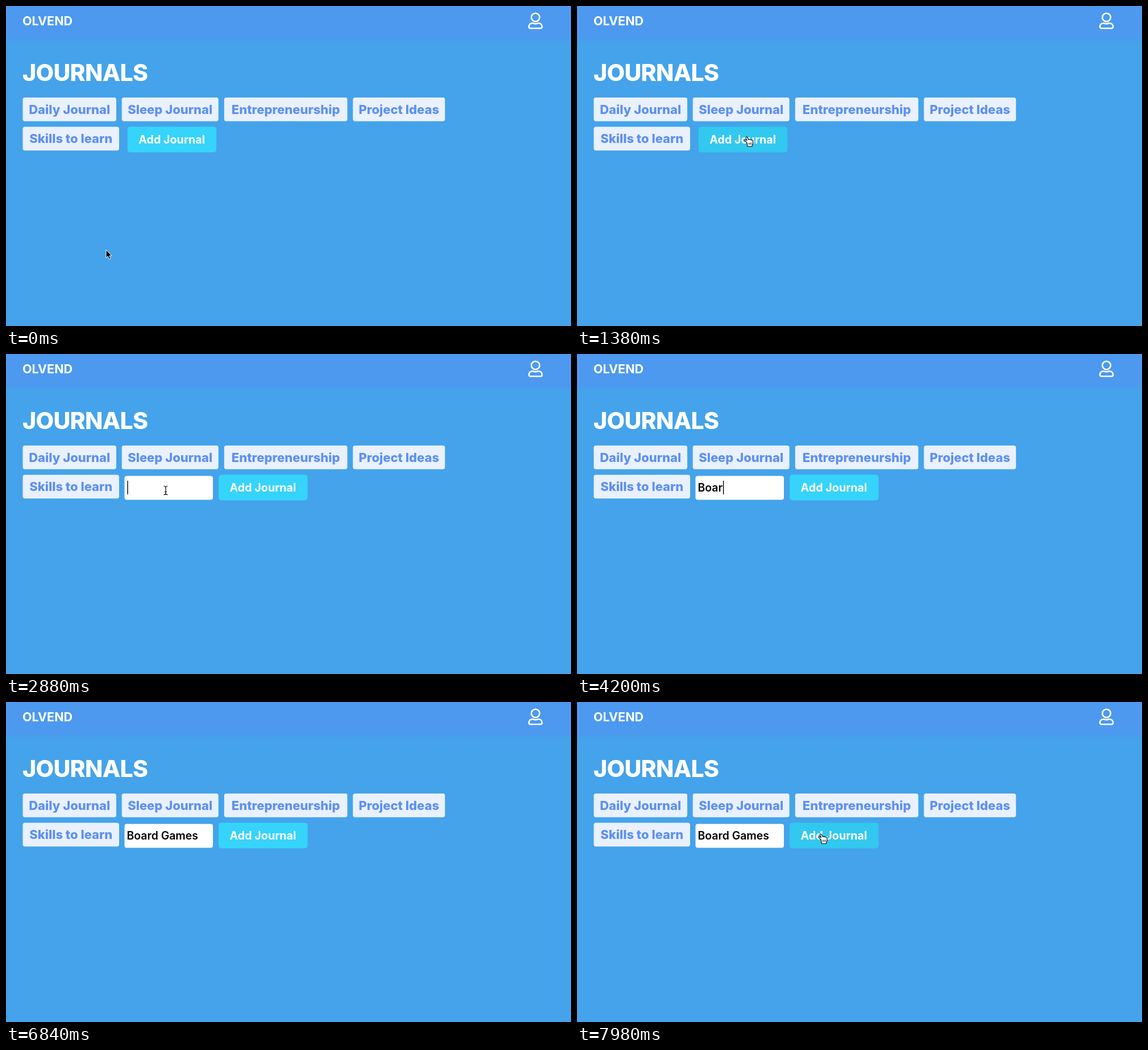
An HTML page for the animation above (8000 ms loop, 994x563 px).

```html
<!DOCTYPE html>
<html lang="en">
<head>
<meta charset="utf-8">
<title>Journals</title>
<style>
  html, body { margin: 0; width: 100%; height: 100%; overflow: hidden; background: #44a3ea; }
  svg { display: block; width: 100vw; height: 100vh; }
  text { font-family: Inter, "Open Sans", sans-serif; font-weight: 800; fill: #fff; white-space: pre; }
  .pill rect { fill: #e9f1fe; }
  .pill text { fill: #5d90f2; font-size: 22px; text-anchor: middle; }
  #button text { font-size: 19.7px; font-weight: 700; text-anchor: middle; }
  #entry { font-size: 19.4px; font-weight: 600; fill: #000; }
  .icon { fill: none; stroke: #fff; stroke-width: 2.6; stroke-linejoin: round; }
</style>
</head>
<body>
<svg viewBox="0 0 994 563" preserveAspectRatio="none">
  <defs>
    <linearGradient id="shade" x2="0" y2="1">
      <stop stop-color="#4a9bed"/>
      <stop offset="1" stop-color="#44a3ea"/>
    </linearGradient>
  </defs>
  <rect width="994" height="563" fill="#44a3ea"/>
  <rect y="56" width="994" height="10" fill="url(#shade)"/>
  <rect width="994" height="57" fill="#4c99ef"/>
  <text x="29" y="34" font-size="21.5" style="font-weight:700">OLVEND</text>
  <g class="icon">
    <circle cx="931.5" cy="20" r="7.3"/>
    <path d="M926.5 30.3C922 30.3 920 33.3 920 36.8A2.4 2.4 0 0 0 922.4 39.2H940.6A2.4 2.4 0 0 0 943 36.8C943 33.3 941 30.3 936.5 30.3C934.5 30.3 933.8 31.2 931.5 31.2S928.5 30.3 926.5 30.3Z"/>
  </g>
  <text x="29" y="131.5" font-size="41" letter-spacing="-.7">JOURNALS</text>
  <g id="pills"></g>
  <g id="field">
    <rect x="208.5" y="214.5" width="155.5" height="42" rx="4" fill="#fff"/>
    <text id="entry" x="212.5" y="242.3"></text>
    <rect id="caret" y="223" width="1.4" height="24"/>
  </g>
  <g id="button">
    <rect y="212.3" width="156.5" height="45.2" rx="5"/>
    <text x="78" y="242.3">Add Journal</text>
  </g>
  <g id="pointer">
    <path id="arrow" d="M0 0V14.2L3.3 11.2L5.5 16.4L8 15.3L5.9 10.3H10.2Z" fill="#000" stroke="#fff" stroke-width="1"/>
    <g id="hand">
      <path d="M-1.6 9.5L-4.8 6.4C-6.4 4.9-4.5 3.3-3 4.4L-1.5 5.8L-3.4 1.2C-4-.6-1.4-1.4-.7.2L1.2 4.2C2 3.2 3.5 3.3 4 4.4C5 3.6 6.4 4 6.7 5.1C8 4.6 9 5.4 9 6.8V11L7.3 16H-.5Z" fill="#fff" stroke="#000" stroke-width="1.1" stroke-linejoin="round"/>
      <path d="M1.7 9.5V13M4 9.5V13M6.3 9.5V13" stroke="#000" stroke-width=".9"/>
    </g>
    <path id="beam" d="M-3.5-7.5Q0-7.5 0-5.5Q0-7.5 3.5-7.5M0-5.5V5.5M-3.5 7.5Q0 7.5 0 5.5Q0 7.5 3.5 7.5M-2 2.5H2" fill="none" stroke="#000" stroke-width="1.2"/>
  </g>
</svg>
<script>
const LOOP = 8000, STEP = 60;
const OPEN_AT = 2520, HIDE_AT = 3420, SHOW_AT = 6900;
const $ = id => document.getElementById(id);
const show = (node, on) => node.setAttribute("visibility", on ? "visible" : "hidden");
const move = (node, x, y) => node.setAttribute("transform", `translate(${x} ${y})`);

// label, left, top, width
const pills = [
  ["Daily Journal", 29.5, 161, 164.5],
  ["Sleep Journal", 203.7, 161, 170],
  ["Entrepreneurship", 383.8, 161, 216.7],
  ["Project Ideas", 610.3, 161, 162],
  ["Skills to learn", 29.5, 212.5, 169.5]
];
$("pills").innerHTML = pills.map(([label, x, y, w]) =>
  `<g class="pill" transform="translate(${x} ${y})"><rect width="${w}" height="41.7" rx="4"/>` +
  `<text x="${w / 2}" y="28.6">${label}</text></g>`).join("");

// time, x, y of the pointer's hot spot
const path = [
  [60, 176, 429], [180, 207, 420], [300, 280, 394], [420, 380, 360],
  [540, 462, 324], [640, 481, 290], [740, 462, 257], [840, 427, 237],
  [1020, 372, 234], [1260, 312, 231], [1500, 289, 231], [2460, 289, 231],
  [2580, 281, 240], [6900, 281, 240], [7200, 310, 242], [7440, 352, 245],
  [7620, 398, 249], [7800, 424, 243], [7980, 431, 233]
];

function pointerAt(t) {
  const i = path.findIndex(p => p[0] >= t);
  if (i < 1) return path[i ? path.length - 1 : 0].slice(1);
  const [t0, x0, y0] = path[i - 1], [t1, x1, y1] = path[i];
  const k = (t - t0) / (t1 - t0);
  return [x0 + (x1 - x0) * k, y0 + (y1 - y0) * k];
}

// text, first key time, delay between keys
const bursts = [["Board ", 3540, 180], ["Games", 5460, 180]];
const keyTimes = bursts.flatMap(([word, start, gap]) => [...word].map((_, i) => start + i * gap));
const phrase = bursts.map(b => b[0]).join("");

function draw(t) {
  const open = t >= OPEN_AT;
  const [x, y] = pointerAt(t);
  const buttonX = open ? 374 : 213.7;
  const inside = (left, width) => x >= left && x <= left + width && y >= 212 && y <= 257;
  const visible = t < HIDE_AT || t >= SHOW_AT;
  const hover = visible && inside(buttonX, 156.5);
  const overField = open && inside(208.5, 155.5);

  move($("button"), buttonX, 0);
  $("button").firstElementChild.setAttribute("fill", hover ? "#33c8ef" : "#36d3fa");

  const typed = keyTimes.filter(k => k <= t);
  $("entry").textContent = phrase.slice(0, typed.length);
  const lastKey = typed.length ? typed[typed.length - 1] : OPEN_AT;
  show($("field"), open);
  show($("caret"), open && (t - lastKey) % 1000 < 500);
  $("caret").setAttribute("x", 213.3 + (typed.length ? $("entry").getComputedTextLength() : 0));

  move($("pointer"), x, y);
  show($("hand"), hover);
  show($("beam"), visible && overField);
  show($("arrow"), visible && !hover && !overField);
}

const start = performance.now();
function tick() {
  const t = (performance.now() - start) % LOOP;
  draw(Math.floor(t / STEP) * STEP);
  requestAnimationFrame(tick);
}
tick();
</script>
</body>
</html>
```
